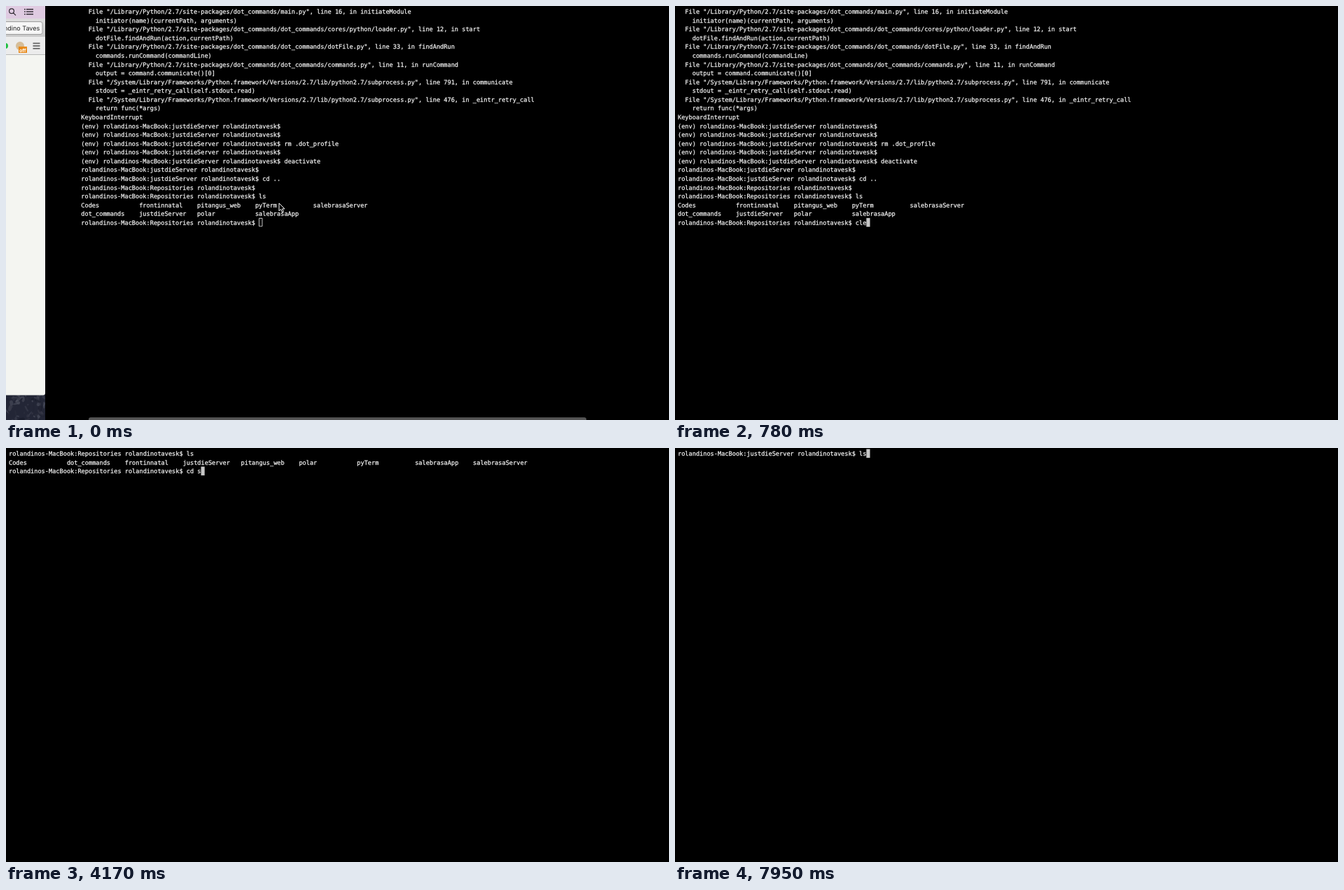
Write an HTML page with a canvas that moves like this. It is 947 by 592 pixels and loops after 7.99 s.

```html
<!DOCTYPE html>
<html lang="en">
<head>
<meta charset="utf-8">
<title>Terminal session</title>
<style>
  html, body { margin: 0; width: 100%; height: 100%; overflow: hidden; background: #000; }
  canvas { display: block; }
</style>
</head>
<body>
<canvas id="stage" width="947" height="592"></canvas>
<script>
const ctx = document.getElementById('stage').getContext('2d');
const W = 947, H = 592, LOOP = 7990;
const CELL = 5.18, ROW = 12.57, LEFT = 4, BASE = 11.1;
const MONO = '8.6px "DejaVu Sans Mono", monospace';
const SANS = 'Inter, "Open Sans", sans-serif';

const prompt = dir => `rolandinos-MacBook:${dir} rolandinotavesk$ `;
const columns = (...names) => names.map(n => n.padEnd(16)).join('');

const env = '(env) ' + prompt('justdieServer');
const lib = '  File "/Library/Python/2.7/site-packages/dot_commands/';
const pkg = lib + 'dot_commands/';
const sys = '  File "/System/Library/Frameworks/Python.framework/Versions/2.7/lib/python2.7/subprocess.py", line ';
const history = [
  lib + 'main.py", line 16, in initiateModule',
  '    initiator(name)(currentPath, arguments)',
  pkg + 'cores/python/loader.py", line 12, in start',
  '    dotFile.findAndRun(action,currentPath)',
  pkg + 'dotFile.py", line 33, in findAndRun',
  '    commands.runCommand(commandLine)',
  pkg + 'commands.py", line 11, in runCommand',
  '    output = command.communicate()[0]',
  sys + '791, in communicate',
  '    stdout = _eintr_retry_call(self.stdout.read)',
  sys + '476, in _eintr_retry_call',
  '    return func(*args)',
  'KeyboardInterrupt',
  env,
  env,
  env + 'rm .dot_profile',
  env,
  env + 'deactivate',
  prompt('justdieServer'),
  prompt('justdieServer') + 'cd ..',
  prompt('Repositories'),
  prompt('Repositories') + 'ls',
  columns('Codes', 'frontinnatal', 'pitangus_web', 'pyTerm', 'salebrasaServer'),
  columns('dot_commands', 'justdieServer', 'polar', 'salebrasaApp')
];
const listing = columns('Codes', 'dot_commands', 'frontinnatal', 'justdieServer',
  'pitangus_web', 'polar', 'pyTerm', 'salebrasaApp', 'salebrasaServer');

// Key presses: time in ms, key
const keys = [
  [600, 'c'], [690, 'l'], [770, 'e'], [850, 'a'], [930, 'r'], [1090, '\n'],
  [1450, 'l'], [1560, 's'], [1740, '\n'],
  [2640, 'c'], [2760, 'd'], [2920, ' '], [3480, 's'], [4450, '\b'],
  [5680, 'j'], [5820, 'u'], [6060, 's'], [6420, '\t'], [6800, '\n'],
  [7150, 'c'], [7220, 'l'], [7290, 'e'], [7350, 'a'], [7420, 'r'], [7520, '\n'],
  [7850, 'l'], [7950, 's']
];

// Desktop switch: time, distance still to travel
const slide = [[0, 103.3], [50, 54], [110, 21], [170, 6.3], [400, 1], [450, 0]];

function terminalAt(t) {
  let rows = history.slice(), dir = 'Repositories', input = '';
  for (const [at, key] of keys) {
    if (at > t) break;
    if (key === '\b') input = input.slice(0, -1);
    else if (key === '\t') input = 'cd justdieServer/';
    else if (key === '\n') {
      rows.push(prompt(dir) + input);
      if (input === 'clear') rows = [];
      else if (input === 'ls') rows.push(listing);
      else dir = input.slice(3, -1);
      input = '';
    } else input += key;
  }
  rows.push(prompt(dir) + input);
  return rows;
}

function rect(x, y, w, h, color) {
  ctx.fillStyle = color;
  ctx.fillRect(x, y, w, h);
}

function disc(x, y, r, color) {
  ctx.fillStyle = color;
  ctx.beginPath();
  ctx.arc(x, y, r, 0, Math.PI * 2);
  ctx.fill();
}

function label(text, x, y, font, color) {
  ctx.font = font;
  ctx.fillStyle = color;
  ctx.fillText(text, x, y);
}

function seeded(seed) {
  return () => (seed = seed * 16807 % 2147483647) / 2147483647;
}

function drawTerminal(rows, dx, focused) {
  const x0 = LEFT + dx;
  ctx.font = MONO;
  ctx.fillStyle = ctx.strokeStyle = '#f4f4f4';
  ctx.lineWidth = 0.25; // slightly heavier strokes
  rows.forEach((line, r) => {
    for (let c = 0; c < line.length; c++) {
      if (line[c] === ' ') continue;
      const x = x0 + c * CELL, y = BASE + r * ROW;
      ctx.fillText(line[c], x, y);
      ctx.strokeText(line[c], x, y);
    }
  });
  const last = rows.length - 1;
  const x = x0 + rows[last].length * CELL, y = 1.5 + last * ROW;
  if (focused) rect(x, y, CELL, ROW, '#c7c7c7');
  else {
    ctx.strokeStyle = '#c0c0c0';
    ctx.lineWidth = 1;
    ctx.strokeRect(Math.round(x) + 0.5, Math.round(y) + 0.5, 4.5, 11.5);
  }
}

function drawWallpaper() {
  const rnd = seeded(41);
  rect(0, 550, 56, 42, '#232636');
  for (let i = 0; i < 60; i++) {
    const tone = 22 + rnd() * 62;
    ctx.fillStyle = `rgba(${tone}, ${tone + 3}, ${tone + 18}, 0.6)`;
    ctx.beginPath();
    ctx.ellipse(rnd() * 56, 556 + rnd() * 36, 1 + rnd() * 5, 0.7 + rnd() * 2, rnd() * 3, 0, Math.PI * 2);
    ctx.fill();
  }
}

// Right edge of the neighbouring desktop, drawn with x = 0..56
function drawNeighbour(dx) {
  if (dx < 47.3) return;
  ctx.save();
  ctx.translate(dx - 103.3, 0);
  ctx.beginPath();
  ctx.rect(-10, 0, 66, H);
  ctx.clip();
  drawWallpaper();

  rect(0, 0, 56, 18, '#dfcbe1');
  ctx.strokeStyle = '#2b252d';
  ctx.lineWidth = 1.2;
  ctx.beginPath();
  ctx.arc(8, 7.3, 3.4, 0, Math.PI * 2);
  ctx.moveTo(10.5, 9.8);
  ctx.lineTo(14, 13.3);
  ctx.stroke();
  for (let i = 0; i < 3; i++) {
    rect(26, 4 + i * 3.5, 1.8, 1.4, '#2b252d');
    rect(29, 4 + i * 3.5, 10, 1.4, '#2b252d');
  }

  const strip = ctx.createLinearGradient(0, 18, 0, 44);
  strip.addColorStop(0, '#dedede');
  strip.addColorStop(1, '#c9c9c9');
  rect(0, 18, 56, 26, strip);
  ctx.fillStyle = '#f6f6f6';
  ctx.strokeStyle = '#9d9d9d';
  ctx.lineWidth = 1;
  ctx.beginPath();
  ctx.roundRect(-10, 22.5, 62, 18, 3);
  ctx.fill();
  ctx.stroke();
  label('ndino Taves', -3, 35, '9px ' + SANS, '#222');

  rect(0, 44, 56, 26, '#ececec');
  rect(0, 69, 56, 1, '#b9b9b9');
  disc(-1, 57, 4, '#22c044');
  disc(20, 57, 6, '#d6bd98');
  rect(18, 58, 12, 9, '#e88a1a');
  label('off', 19, 65.5, 'bold 7px ' + SANS, '#fff');
  for (let i = 0; i < 3; i++) rect(38.5, 52.5 + i * 3.7, 10, 1.8, '#666');

  ctx.fillStyle = '#f4f5f1';
  ctx.beginPath();
  ctx.roundRect(-10, 70, 66, 486.5, [0, 0, 3, 0]);
  ctx.fill();
  ctx.restore();
}

function drawDock() {
  ctx.fillStyle = '#555';
  ctx.beginPath();
  ctx.roundRect(118, 588.3, 711, 10, 3);
  ctx.fill();
}

function drawPointer(x, y) {
  ctx.beginPath();
  [[0, 0], [0, 11], [2.6, 8.7], [4.5, 12.8], [6.4, 12], [4.6, 8], [8, 8]]
    .forEach(([px, py]) => ctx.lineTo(x + px, y + py));
  ctx.closePath();
  ctx.fillStyle = '#000';
  ctx.strokeStyle = '#fff';
  ctx.lineWidth = 1;
  ctx.fill();
  ctx.stroke();
}

function draw(t) {
  const dx = slide.filter(([at]) => at <= t).pop()[1];
  rect(0, 0, W, H, '#000');
  drawNeighbour(dx);
  drawTerminal(terminalAt(t), dx, t >= 450);
  if (t < 50) drawDock();
  if (t < 600) drawPointer(390, 282);
}

ctx.textRendering = 'geometricPrecision';
ctx.lineJoin = 'round';
const start = performance.now();
function tick() {
  draw((performance.now() - start) % LOOP);
  requestAnimationFrame(tick);
}
tick();
</script>
</body>
</html>
```
